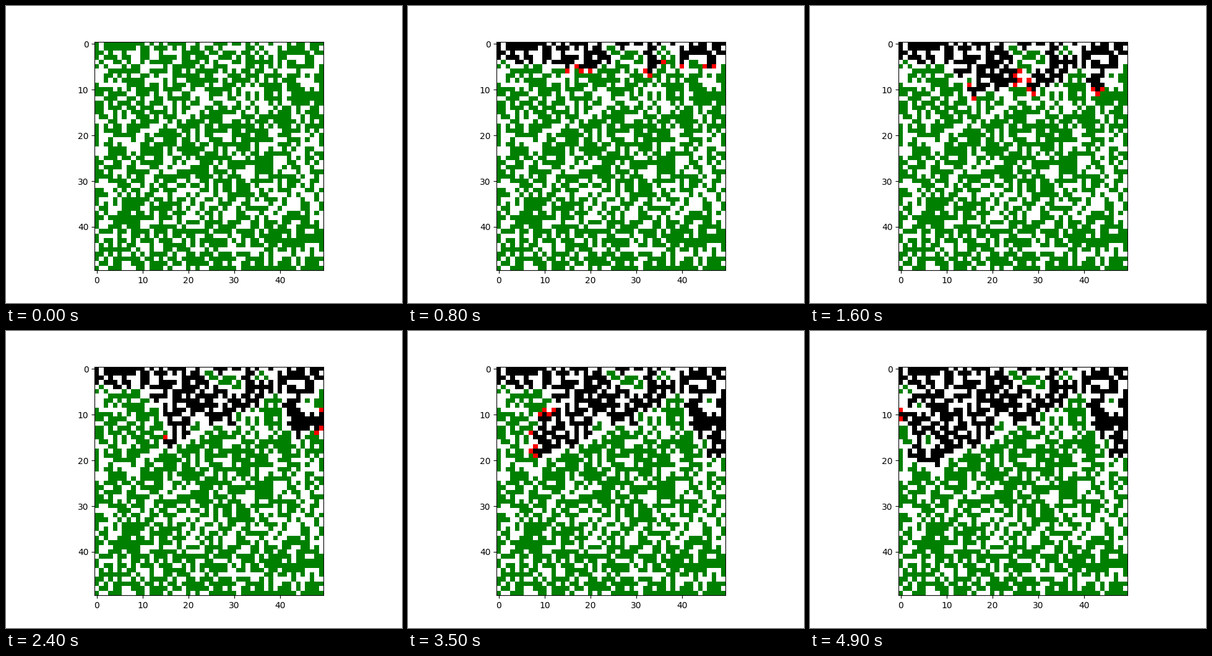
Recreate the animation shown at these times as a matplotlib script. Size 640x480 px, loop 5000 ms.

```python
import matplotlib.pyplot as plt
import numpy as np
from matplotlib.animation import FuncAnimation
from matplotlib.colors import ListedColormap

SIZE = 50
DENSITY = 0.6
FRAMES = 50
INTERVAL = 100

EMPTY, TREE, FIRE, ASH = range(4)


def plant_forest():
    rng = np.random.RandomState(1)
    return np.where(rng.rand(SIZE, SIZE) < DENSITY, TREE, EMPTY)


def ignite(forest):
    """Set every tree along the top edge on fire."""
    grid = forest.copy()
    grid[0, grid[0] == TREE] = FIRE
    return grid


def spread(grid):
    """Fire jumps to the four direct neighbours and leaves ash behind."""
    burning = grid == FIRE
    near = np.zeros_like(burning)
    near[1:] |= burning[:-1]
    near[:-1] |= burning[1:]
    near[:, 1:] |= burning[:, :-1]
    near[:, :-1] |= burning[:, 1:]
    grid = grid.copy()
    grid[near & (grid == TREE)] = FIRE
    grid[burning] = ASH
    return grid


def simulate():
    states = [plant_forest()]
    states.append(ignite(states[0]))
    while len(states) < FRAMES:
        states.append(spread(states[-1]))
    return states


states = simulate()
fig, ax = plt.subplots(figsize=(6.4, 4.8), dpi=100)
colors = ListedColormap(["white", "green", "red", "black"])
image = ax.imshow(states[0], cmap=colors, vmin=EMPTY, vmax=ASH,
                  interpolation="nearest")


def update(frame):
    image.set_data(states[frame])
    return (image,)


animation = FuncAnimation(fig, update, frames=FRAMES, interval=INTERVAL,
                          repeat=True, repeat_delay=0)
plt.show()
```
